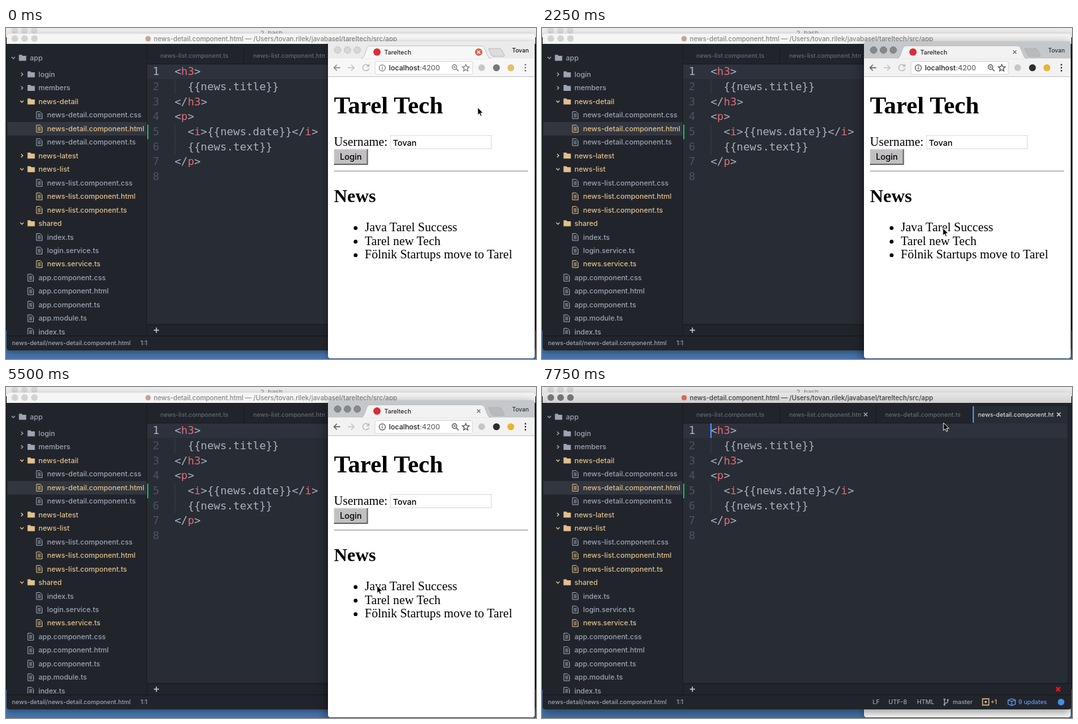
An HTML page that plays this animation: 800x500 px, repeating every 8000 ms.

```html
<!DOCTYPE html>
<html lang="en">
<head>
<meta charset="utf-8">
<title>Editor and browser</title>
<style>
  html, body { margin: 0; width: 100%; height: 100%; overflow: hidden; background: #4674ab; }
  svg { display: block; width: 100vw; height: 100vh; }
  text { font-family: Inter, sans-serif; font-weight: 500; white-space: pre; }
  .code { font: 16.35px "DejaVu Sans Mono", monospace; }
  .serif { font-family: "Liberation Serif", serif; font-weight: 400; }
  .bold { font-weight: 700; }
  .line { fill: none; stroke-width: 1.3; }

  #atom { filter: drop-shadow(0 3px 4px rgba(0,0,0,.35)); }
  #atom .bar { fill: #f5f5f5; }
  #atom .dot { fill: #d3d3d3; }
  #atom .name { fill: #858585; }
  #atom .badge { fill: #c3a39b; }
  #atom .focus { visibility: hidden; }
  #atom.on .bar { fill: url(#barOn); }
  #atom.on .dot { fill: #747476; }
  #atom.on .name { fill: #3c3c3c; }
  #atom.on .badge { fill: #d9694f; }
  #atom.on .focus { visibility: visible; }
  #atom.on { filter: drop-shadow(0 5px 7px rgba(0,0,0,.4)); }

  #web { filter: drop-shadow(0 3px 5px rgba(0,0,0,.4)); }
  #web .strip { fill: #ebebeb; }
  #web .tab { fill: #f7f7f7; }
  #web .dot { fill: #d6d6d6; stroke: #c4c4c4; }
  #web .plus { fill: #dcdcdc; }
  #web .user { fill: #111; }
  #web .tool { stroke: #858585; }
  #web .ext { fill: #777; }
  #web .ext2 { fill: #e2c168; }
  #web.on { filter: drop-shadow(0 6px 9px rgba(0,0,0,.55)); }
  #web.on .strip { fill: #c5c8cb; }
  #web.on .tab { fill: #f2f2f2; }
  #web.on .dot { fill: #86888a; stroke: #7a7c7e; }
  #web.on .plus { fill: #b8babc; }
  #web.on .user { fill: #2e2e2e; }
  #web.on .tool { stroke: #5a5a5a; }
  #web.on .ext { fill: #2d2d2d; }
  #web.on .ext2 { fill: #e8b52f; }
</style>
</head>
<body>
<svg id="stage" viewBox="0 0 800 500" preserveAspectRatio="none">
  <defs>
    <linearGradient id="barOn" x2="0" y2="1">
      <stop stop-color="#e9e8e9"/><stop offset="1" stop-color="#d2d1d2"/>
    </linearGradient>
    <clipPath id="treeClip"><rect x="2" y="24" width="210" height="439"/></clipPath>
    <clipPath id="tabClip"><rect x="360" y="24" width="122" height="30"/></clipPath>
    <clipPath id="openClip"><rect id="openRect" x="650" y="24" width="133" height="30"/></clipPath>
  </defs>
  <g id="back"></g>
  <g id="atom"></g>
  <g id="web"></g>
  <path id="mouse" d="M0 0V11.6L2.6 9.2L4.4 13.2L6.3 12.4L4.6 8.5H8.2Z"
        fill="#000" stroke="#fff" stroke-width=".9" stroke-linejoin="round"/>
</svg>
<script>
const $ = id => document.getElementById(id);
const USER = 'Tovan';
const GREY = '#9da5b4', GOLD = '#e2c08d', BLUE = '#6494ed';

const rect = (x, y, w, h, fill, more = '') =>
  `<rect x="${x}" y="${y}" width="${w}" height="${h}" fill="${fill}" ${more}/>`;
const circle = (x, y, r, fill, more = '') =>
  `<circle cx="${x}" cy="${y}" r="${r}" fill="${fill}" ${more}/>`;
const text = (x, y, s, size, fill, more = '') =>
  `<text x="${x}" y="${y}" font-size="${size}" fill="${fill}" ${more}>${s}</text>`;
const line = (d, stroke, more = '') =>
  `<path class="line" d="${d}" stroke="${stroke}" ${more}/>`;
const cross = (x, y, r, stroke, more = '') =>
  line(`M${x - r} ${y - r}l${2 * r} ${2 * r}m0 ${-2 * r}l${-2 * r} ${2 * r}`, stroke, more);
const dots = (x, y, r) =>
  [0, 1, 2].map(i => circle(x + 14.8 * i, y, r, '', 'class="dot"')).join('');

function drawBack() {
  return rect(0, 0, 800, 500, '#4674ab') +
    rect(0, 0, 800, 457, '#0d1c18') +
    rect(0, 0, 800, 14, '#ebebeb') +
    [13, 27.8, 42.6].map(x => circle(x, 4, 5, '#d6d6d6')).join('') +
    text(384, 10.5, '2. bash', 9.5, '#8f8f8f');
}

// Tree rows: kind (d closed folder, o open folder, f file, n nested file), name, * when modified
const TREE = `d login|d members|o news-detail*|n news-detail.component.css|n news-detail.component.html*|
n news-detail.component.ts|d news-latest*|o news-list*|n news-list.component.css|n news-list.component.html*|
n news-list.component.ts*|o shared*|n index.ts|n login.service.ts|n news.service.ts*|f app.component.css|
f app.component.html|f app.component.ts|f app.module.ts|f index.ts`.split('|').map(s => s.trim());

function folder(x, y, open, label, fill) {
  const arrow = open ? `M${x - 2.5} ${y - 1.2}l2.5 2.6l2.5 -2.6` : `M${x - 1.2} ${y - 2.5}l2.6 2.5l-2.6 2.5`;
  return line(arrow, fill) +
    `<path d="M${x + 8.5} ${y - 4.5}h4.5l1 1.5h5.5v7.5h-11z" fill="${fill}"/>` +
    text(x + 25, y + 4, label, 10.7, fill);
}

function file(x, y, label, fill) {
  return line(`M${x - 4} ${y - 5}h5.5l3 3v7.5h-8.5zM${x - 2} ${y - 1.5}h4.5m-4.5 2h4.5m-4.5 2h4.5`, fill, 'style="stroke-width:1"') +
    text(x + 12, y + 4, label, 10.7, fill);
}

function drawTree() {
  const rows = TREE.map((row, i) => {
    const y = 70 + 20.46 * i, kind = row[0];
    const fill = row.endsWith('*') ? GOLD : GREY;
    const label = row.slice(2).replace('*', '');
    if (kind === 'd' || kind === 'o') return folder(24, y, kind === 'o', label, fill);
    return file(kind === 'n' ? 50 : 37, y, label, fill);
  });
  return rect(2, 24, 211, 441, '#21252b') + rect(2, 142, 211, 20.5, '#31363f') +
    `<g clip-path="url(#treeClip)">${folder(11, 45, true, 'app', GREY)}${rows.join('')}</g>`;
}

function drawTabs() {
  const tab = (x, s, fill = '#626a78', more = '') => text(x, 45, s, 9.1, fill, more);
  return rect(213, 24, 586, 31, '#21252b') +
    [358, 503, 650].map(x => rect(x, 29, 1, 25, '#181a1f')).join('') +
    rect(213, 54, 580, 1, '#181a1f') +
    rect(651, 29, 142, 26, '#282c34') + rect(650, 29, 2, 25, '#568af2') +
    tab(233, 'news-list.component.ts') +
    tab(373, 'news-list.component.html', undefined, 'clip-path="url(#tabClip)"') +
    tab(518, 'news-detail.component.ts') +
    tab(658, 'news-detail.component.html', '#d7dae0', 'clip-path="url(#openClip)"') +
    cross(488.5, 41.5, 2.7, GREY) +
    cross(780, 41.5, 2.7, '#d7dae0', 'id="openClose"');
}

// Code: tag names sit between ~ marks
const CODE = ['<~h3~>', '  {{news.title}}', '</~h3~>', '<~p~>',
  '  <~i~>{{news.date}}</~i~>', '  {{news.text}}', '</~p~>', ''];

function drawCode() {
  const step = 22.66, adv = 9.84;
  const rows = CODE.map((src, i) => {
    const y = 71.4 + step * i, body = src.trimStart(), indent = src.length - body.length;
    const spans = body.split('~').map((s, k) =>
      `<tspan fill="${k % 2 ? '#e06c75' : '#abb2bf'}">${s.replace(/</g, '&lt;').replace(/>/g, '&gt;')}</tspan>`);
    return `<text class="code" x="221.5" y="${y}" fill="${i ? '#4b5263' : '#abb2bf'}">${i + 1}</text>` +
      `<text class="code" x="${254.5 + adv * indent}" y="${y}">${spans.join('')}</text>` +
      (indent ? rect(254.5, y - 16.5, 1, step, '#3a404b') : '');
  });
  return rect(213, 55, 580, 394, '#282c34') + rect(213, 55, 580, 22, '#2d323d') +
    rect(213, 146, 2, 22, '#20b45c') + rows.join('') +
    rect(254, 55, 2, 22, '#528bff', 'class="focus"') +
    rect(793, 55, 6, 394, '#21252b') + rect(212, 24, 1, 441, '#181a1f');
}

function drawStatus() {
  const y = 479, item = (x, s, fill = GREY) => text(x, y, s, 9.08, fill);
  return rect(213, 448, 586, 17, '#21252b') + rect(213, 447.5, 586, 1, '#14161a') +
    line('M223 456.5h8m-4 -4v8', '#c3c8d2', 'style="stroke-width:1.5"') +
    cross(779, 456.5, 3, '#f0141e', 'style="stroke-width:2.4"') +
    `<path d="M1 465H799V483Q799 487 795 487H5Q1 487 1 483Z" fill="#21252b"/>` +
    rect(1, 464.5, 798, 1, '#14161a') +
    item(9, 'news-detail/news-detail.component.html') + item(203, '1:1') +
    item(499, 'LF') + item(523, 'UTF-8') + item(566, 'HTML') +
    line('M607.5 473v6m5 -5v1q0 2 -5 3', GREY) +
    circle(607.5, 472, 1.4, GREY) + circle(607.5, 480, 1.4, GREY) + circle(612.5, 473, 1.4, GREY) +
    item(620, 'master') +
    line('M665 471h9.5v9.5h-9.5z', GOLD) + circle(669.8, 475.8, 1.7, GOLD) + item(677, '+1', GOLD) +
    line('M703.5 473l5.5 -2l5.5 2v6l-5.5 2l-5.5 -2zl5.5 2l5.5 -2m-5.5 2v6', BLUE) +
    item(719, '9 updates', BLUE) + circle(783.5, 476, 5, '#3f8fe6');
}

function drawAtom() {
  return `<path class="bar" d="M1 24V13Q1 8.5 5.5 8.5H794.5Q799 8.5 799 13V24Z"/>` +
    rect(1, 24, 798, 460, '#21252b') +
    dots(13.3, 16, 5) + circle(214.5, 16.3, 4, '', 'class="badge"') +
    text(223, 19.6, `news-detail.component.html — /Users/${USER.toLowerCase()}.rilek/javabasel/tareltech/src/app`, 9.85, '', 'class="name"') +
    drawTree() + drawTabs() + drawCode() + drawStatus();
}

function drawBar() {
  const tool = 'class="line tool"';
  const mark = d => `<path d="${d}" ${tool}/>`;
  return `<path class="strip" d="M486 74V24.5Q486 20 490.5 20H793.5Q798 20 798 24.5V74Z"/>` +
    dots(500.6, 33.3, 5) +
    rect(486, 46, 312, 27.5, '', 'class="tab"') +
    `<path class="tab" d="M535 46.5Q539 46 541 41L545 30Q546 27 550 27H717Q721 27 722 30L727 42Q728 46 733 46.5Z" stroke="#b4b4b4" stroke-width=".7"/>` +
    rect(534, 46.2, 200, 2, '', 'class="tab"') +
    `<path class="plus" d="M729 31H745Q747 31 748 33L752 41Q753 43 751 43H736Q734 43 733 41L728.5 32Z" stroke="#a9a9a9" stroke-width=".7"/>` +
    circle(560, 36.3, 5.5, '#dd2c35') + text(571, 39.7, 'Tareltech', 9.1, '#222') +
    `<g id="hotClose">${circle(713.5, 36.4, 5.6, '#d9654f')}${cross(713.5, 36.4, 2.3, '#fff')}</g>` +
    cross(713.5, 36.4, 2.5, '#666', 'id="coldClose"') +
    text(764, 37.2, USER, 8.7, '', 'class="user"') +
    mark('M504.5 60H495m4.5 -4.5l-4.5 4.5l4.5 4.5') +
    line('M516 60h9.5m-4.5 -4.5l4.5 4.5l-4.5 4.5', '#c4c4c4') +
    line('M547 57A4.7 4.7 0 1 0 547.8 61.2M548 54.5v3.5h-3.5', '#b5b5b5') +
    rect(557, 50.5, 147, 19.5, '#fff', 'rx="2.5" stroke="#cfcfcf" stroke-width=".8"') +
    `<circle cx="568" cy="60.3" r="4.6" ${tool}/>` + mark('M568 59.5v3.3m0 -5.6v1.2') +
    text(578, 64, 'localhost<tspan fill="#666">:4200</tspan>', 10.7, '#1c1c1c') +
    `<circle cx="677" cy="59" r="3.5" ${tool}/>` + mark('M679.7 61.7l3.5 3.5M675.3 59h3.4') +
    mark('M694 55l1.5 3.4l3.7 .4l-2.8 2.5l.8 3.6l-3.2 -1.9l-3.2 1.9l.8 -3.6l-2.8 -2.5l3.7 -.4z') +
    circle(718, 60, 5, '#c6c6c6') + circle(740.3, 60, 5.2, '', 'class="ext"') +
    circle(762, 60, 5.2, '', 'class="ext2"') +
    [55.5, 60, 64.5].map(y => circle(784, y, 1.2, '', 'class="ext"')).join('') +
    rect(486, 73, 312, 1, '#c6c6c6');
}

function drawPage() {
  const serif = (x, y, s, size, bold) => text(x, y, s, size, '#000', `class="serif${bold ? ' bold' : ''}"`);
  const items = ['Java Tarel Success', 'Tarel new Tech', 'Fölnik Startups move to Tarel'];
  return `<path d="M486 74H798V495Q798 499 794 499H490Q486 499 486 495Z" fill="#fff"/>` +
    serif(495, 129, 'Tarel Tech', 36.8, true) +
    serif(495, 177.6, 'Username:', 18.7) +
    rect(580.5, 162.5, 152, 20, '#fff', 'stroke="#dcdcdc"') + text(584, 177.6, USER, 12.3, '#000') +
    rect(495, 183, 51, 23.5, '#c1bfc1') +
    line('M495.5 206V183.5H546', '#d2d0d2') +
    line('M495 205.8H545.5V183', '#5f5f5f', 'style="stroke-width:1.8"') +
    text(504, 199, 'Login', 12.5, '#000') +
    rect(495, 215.5, 293, 1.2, '#9a9a9a') +
    serif(495, 262.6, 'News', 27.8, true) +
    items.map((s, i) => circle(527.7, 302.2 + 20.5 * i, 2.9, '#000') + serif(541.5, 307 + 20.5 * i, s, 18.7)).join('');
}

$('back').innerHTML = drawBack();
$('atom').innerHTML = drawAtom();
$('web').innerHTML = drawBar() + drawPage();

const LOOP = 8000, STEP = 250;
// Pointer stops: time, x, y
const PATH = [[0, 712, 120], [250, 708, 132], [1000, 590, 296], [1250, 582, 305], [2250, 605, 302],
  [2750, 631, 303], [3250, 608, 303], [3500, 608, 303], [4000, 575, 340], [4500, 555, 377], [4750, 660, 443],
  [5000, 645, 454], [5500, 560, 300], [6000, 430, 107], [6500, 415, 150], [6750, 417, 148], [7000, 437, 129],
  [7500, 575, 72], [7750, 606, 54]];

function pointer(t) {
  const i = PATH.findIndex(p => p[0] >= t);
  if (i < 1) return PATH[0].slice(1);
  const [t0, x0, y0] = PATH[i - 1], [t1, x1, y1] = PATH[i];
  const k = (t - t0) / (t1 - t0);
  return [x0 + (x1 - x0) * k, y0 + (y1 - y0) * k];
}

const show = (id, on) => $(id).setAttribute('visibility', on ? 'visible' : 'hidden');
let last = -1;

function draw(t) {
  const webOn = t >= 500 && t < 7000, atomOn = t >= 7000, closable = t >= 7500;
  $('web').classList.toggle('on', webOn);
  $('atom').classList.toggle('on', atomOn);
  $('stage').append(...(atomOn ? [$('web'), $('atom')] : [$('atom'), $('web')]), $('mouse'));
  show('hotClose', t < 500);
  show('coldClose', t >= 500);
  show('openClose', closable);
  $('openRect').setAttribute('width', closable ? 122 : 133);
  $('mouse').setAttribute('transform', `translate(${pointer(t)})`);
}

function tick() {
  const t = Math.floor(performance.now() % LOOP / STEP) * STEP;
  if (t !== last) draw(last = t);
  requestAnimationFrame(tick);
}
tick();
</script>
</body>
</html>
```
